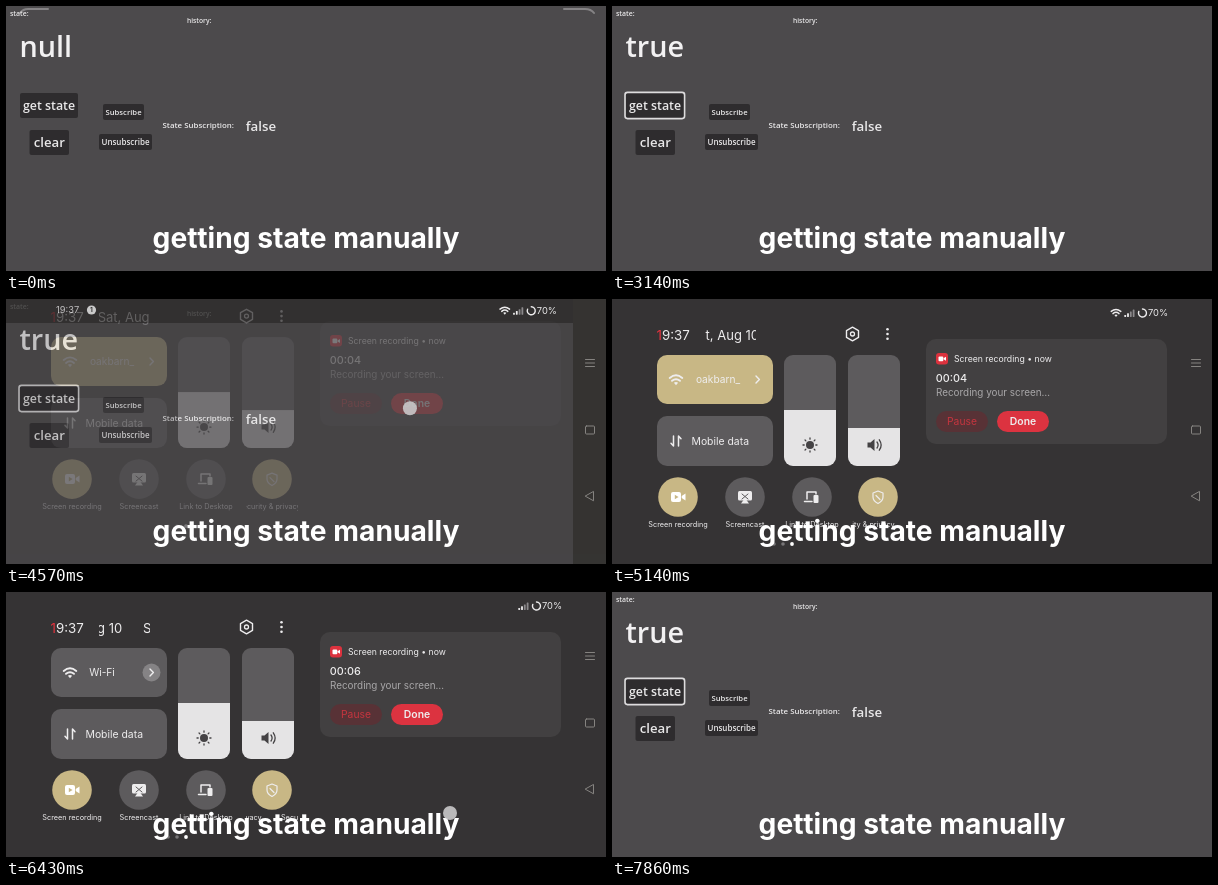
Animation of 600x265 px, one loop 8 s. Source, as an HTML page:

```html
<!DOCTYPE html>
<html lang="en">
<head>
<meta charset="utf-8">
<title>Getting state manually</title>
<style>
  html, body { margin: 0; width: 100%; height: 100%; overflow: hidden; background: #4c4a4c; }
  svg { display: block; width: 600px; height: 265px; }
  .app text { font-family: "Open Sans", sans-serif; font-weight: 600; fill: #e9e8e9; }
  .app .value { filter: blur(.5px); fill: #f2f1f2; }
  .ui text { font-family: Inter, sans-serif; fill: #eeedee; }
  .caption { font: 700 28.2px Inter, sans-serif; fill: #fff; }
  .line { fill: none; stroke: #eeedee; stroke-linecap: round; stroke-linejoin: round; }
</style>
</head>
<body>
<svg id="stage" viewBox="0 0 600 265" xmlns="http://www.w3.org/2000/svg"></svg>
<script>
const LOOP = 8000, STEP = 1000 / 7;
const GOLD = '#c8b785', GREY = '#5d5b5d', DARK = '#2e2c2e', PANEL = '#353334', LIGHT = '#eeedee';

const rect = (x, y, w, h, r, fill, extra = '') =>
  `<rect x="${x}" y="${y}" width="${w}" height="${h}" rx="${r}" fill="${fill}" ${extra}/>`;
const circle = (x, y, r, fill, extra = '') => `<circle cx="${x}" cy="${y}" r="${r}" fill="${fill}" ${extra}/>`;
const text = (x, y, size, content, extra = '') =>
  `<text x="${x}" y="${y}" font-size="${size}" ${extra}>${content}</text>`;
const line = (d, width = 1.3, extra = '') => `<path class="line" d="${d}" stroke-width="${width}" ${extra}/>`;
const group = (id, content, extra = '') => `<g id="${id}" ${extra}>${content}</g>`;
const MID = 'text-anchor="middle"';

const button = (x, y, w, h, label, size, base) =>
  rect(x, y, w, h, 2, DARK) + text(x + w / 2, base, size, label, MID);

const wifiIcon = (x, y, s) => `<g transform="translate(${x} ${y}) scale(${s})">` +
  line('M-6 -2Q0 -7 6 -2M-3.8 .8Q0 -2.4 3.8 .8', 1.8) +
  `<path d="M-2 2.6Q0 1 2 2.6L0 5Z" fill="${LIGHT}"/></g>`;

const marquee = (id, x, y, w, size, content, gap) =>
  `<clipPath id="${id}Clip"><rect x="${x}" y="${y - 14}" width="${w}" height="20"/></clipPath>
  <g clip-path="url(#${id}Clip)"><g id="${id}">${text(0, y, size, content)}${text(gap, y, size, content)}</g></g>`;

const app = `<g class="app">
  ${rect(0, 0, 600, 265, 0, '#4c4a4c')}
  ${group('corners', line('M14 7Q17 3 22 3H42M558 3H579Q585 3 588 7', 2, 'style="stroke:#858385"'))}
  ${text(4, 10, 6.9, 'state:')}
  ${text(181, 17, 6.7, 'history:')}
  ${text(13.5, 51.2, 28.8, 'null', 'id="value" class="value"')}
  ${button(14, 87, 58, 25, 'get state', 12.4, 104.4)}
  ${group('focus', rect(13, 86.4, 59.6, 26.2, 2.5, 'none', 'stroke="#dddcdd" stroke-width="1.6"'))}
  ${button(23.5, 124, 39.5, 25, 'clear', 13.2, 141.3)}
  ${button(97, 98, 41, 16, 'Subscribe', 7.7, 109)}
  ${button(93, 128, 53, 16, 'Unsubscribe', 8, 139)}
  ${text(156.5, 122.4, 7.9, 'State Subscription:')}
  ${text(239.7, 124.6, 13.3, 'false')}
</g>`;

const bars = group('bars',
  rect(0, 0, 567, 24, 0, '#282725', 'opacity=".74"') + rect(567, 0, 33, 265, 0, '#353431') +
  text(50, 14.3, 9.3, '19:37') + circle(85.5, 11, 4.6, '#fff') +
  text(85.5, 13.4, 6.5, '1', MID + ' style="fill:#333;font-weight:700"'));

const tile = (x, label, fill, icon) =>
  circle(x, 198, 19.8, fill) + icon + (label ? text(x, 228.4, 7.3, label, MID) : '');

const slider = (x, top) => {
  const id = 'slider' + x;
  return `<clipPath id="${id}">${rect(x, 56, 52, 111, 9, '#fff')}</clipPath>
    <g clip-path="url(#${id})">${rect(x, 56, 52, 111, 0, GREY)}${rect(x, top, 52, 170 - top, 0, '#e5e4e5')}</g>`;
};

const sunRays = Array.from({ length: 8 }, (_, i) => {
  const a = i * Math.PI / 4, c = Math.cos(a), s = Math.sin(a);
  return `M${198 + 5.8 * c} ${146 + 5.8 * s}L${198 + 7 * c} ${146 + 7 * s}`;
}).join('');
const inkStroke = 'style="stroke:#444244"';

const quickSettings = `
  ${text(44.5, 40.5, 13.3, '<tspan style="fill:#e5323d">1</tspan>9:37')}
  ${marquee('date', 93, 40.5, 51, 13, 'Sat, Aug 10', 90)}
  ${line('M240.5 28.2L246.5 31.6V38.4L240.5 41.8L234.5 38.4V31.6Z', 1.4)}
  ${circle(240.5, 35, 2, 'none', 'stroke="#eeedee" stroke-width="1.3"')}
  ${[30.3, 35, 39.7].map(y => circle(275.5, y, 1.3, LIGHT)).join('')}
  ${rect(45, 56, 116, 49, 10, GOLD, 'id="wifiTile"')}
  ${wifiIcon(64, 81, 1.05)}
  ${text(106, 84.3, 10.2, '', MID + ' id="wifiLabel"')}
  ${circle(145.5, 80.5, 9, '#858385', 'id="chevronDisc"')}
  ${line('M144 77L147.4 80.5L144 84', 1.4)}
  ${rect(45, 117, 116, 50, 10, GREY)}
  ${line('M61.5 137V147L59 144.3M66.5 147V137L69 139.7', 1.5)}
  ${text(79.5, 146, 10.4, 'Mobile data')}
  ${slider(172, 111)}${slider(236, 129)}
  ${circle(198, 146, 4, '#444244')}${line(sunRays, 1.3, inkStroke)}
  <path d="M255.5 143.5H258.5L262.5 140V152L258.5 148.5H255.5Z" fill="#444244"/>
  ${line('M265 143Q267.2 146 265 149M267.3 140.8Q271 146 267.3 151.2', 1.3, inkStroke)}
  ${tile(66, 'Screen recording', GOLD, rect(59, 193, 10, 10, 2, '#fff') +
    '<path d="M69.7 197L73.5 194.5V201.5L69.7 199Z" fill="#fff"/>' +
    '<path d="M62.8 195.7L66.6 198L62.8 200.3Z" fill="#c8b785"/>')}
  ${tile(133, 'Screencast', GREY, rect(126, 192, 14, 9.5, 1.5, LIGHT) +
    line('M130 195L136 200M130 200L136 195', 1, 'style="stroke:#5d5b5d"') +
    `<path d="M133 199L137 204.5H129Z" fill="${LIGHT}"/>`)}
  ${tile(200, 'Link to Desktop', GREY, line('M195 200V193H204V195M192.5 202.5H200', 1.5) +
    rect(201.5, 196, 5, 8, 1, LIGHT))}
  ${tile(266, '', GOLD, line('M266 192L271 194V198Q271 202 266 204.5Q261 202 261 198V194Z', 1.2) +
    line('M264 196.5L268 200.5', 1.2))}
  ${marquee('privacy', 240, 228.4, 52, 7.3, 'Security &amp; privacy', 82)}
  ${circle(162, 245, 1.8, '#777577')}${circle(171, 245, 1.8, '#777577')}${circle(180, 245, 1.9, '#fff')}`;

const notification = `
  ${rect(314, 40, 241, 105, 10, '#424041')}
  ${rect(324, 54, 12, 11.5, 3, '#dc323e')}
  ${rect(326.5, 57.4, 4.8, 4.8, 1, '#fff')}<path d="M331.5 59.3L334 57.8V61.8L331.5 60.3Z" fill="#fff"/>
  ${text(342, 63, 8.7, 'Screen recording • now')}
  ${text(323.8, 83, 10.8, '', 'id="timer" font-weight="500"')}
  ${text(324, 97.2, 9.9, 'Recording your screen…', 'style="fill:#a9a7a9"')}
  ${rect(324, 112, 52, 21, 10.5, '#583236')}
  ${text(350, 126.4, 10.3, 'Pause', MID + ' style="fill:#c5353f"')}
  ${rect(385, 112, 52, 21, 10.5, '#dc3340')}
  ${text(411, 126.4, 10.4, 'Done', MID + ' font-weight="600"')}`;

const panel = group('panel', rect(0, 0, 600, 265, 0, PANEL) + group('panelBody', quickSettings + notification));

const status = group('status',
  group('statusWifi', wifiIcon(497, 11, .8)) +
  [0, 1, 2, 3].map(i => rect(505.3 + i * 2.8, 13 - i * 1.8, 1.8, 2 + i * 1.8, .4, i < 2 ? LIGHT : '#8b898b')).join('') +
  line('M523.5 7A4 4 0 1 1 519.8 9.4', 1.4) + text(529, 14.4, 9.3, '70%'));

const nav = group('nav', ['M579.5 60.5H588.5M579.5 64H588.5M579.5 67.5H588.5',
  'M580.5 127H587.5Q588.5 127 588.5 128V134Q588.5 135 587.5 135H580.5Q579.5 135 579.5 134V128Q579.5 127 580.5 127Z',
  'M587.5 192.8V201.8L579.5 197.3Z'].map(d => line(d, 1, 'style="stroke:#858380"')).join(''));

const stage = document.getElementById('stage');
stage.innerHTML = app + `<g class="ui">${bars}${panel}${status}${nav}</g>` +
  text(300, 242.4, 28.2, 'getting state manually', MID + ' class="caption"') +
  circle(0, 0, 7, '#c9c8c9', 'id="touch" opacity=".9"');

const part = {};
stage.querySelectorAll('[id]').forEach(node => part[node.id] = node);

const ramp = (t, from, to) => {
  const p = Math.min(1, Math.max(0, (t - from) / (to - from)));
  return p * p * (3 - 2 * p);
};
const fade = (node, value) => node.setAttribute('opacity', value);
const move = (node, x, y = 0) => node.setAttribute('transform', `translate(${x} ${y})`);

// Each gesture: start, end, start point, end point
const gestures = [
  [1990, 2200, 48, 104, 48, 104],
  [4270, 4840, 406, 12, 402, 200],
  [5270, 5440, 92, 82, 92, 82],
  [6410, 6720, 444, 221, 438, 70],
];

function touchAt(t) {
  const hit = gestures.find(g => t >= g[0] && t < g[1]);
  part.touch.style.display = hit ? '' : 'none';
  if (!hit) return;
  const [start, end, x0, y0, x1, y1] = hit;
  const p = ramp(t, start + 20, end);
  move(part.touch, x0 + (x1 - x0) * p, y0 + (y1 - y0) * p);
}

function update(t) {
  const fetched = t >= 2280;
  fade(part.corners, 1 - ramp(t, 1900, 2600));
  part.value.textContent = fetched ? 'true' : 'null';
  part.focus.style.display = t >= 2130 ? '' : 'none';

  const barsShown = ramp(t, 3800, 4200) * (1 - ramp(t, 6780, 6995));
  const opened = ramp(t, 4430, 4860) * (1 - ramp(t, 6440, 6850));
  fade(part.bars, barsShown);
  fade(part.nav, barsShown);
  fade(part.status, barsShown);
  move(part.status, 7 * opened, 3 * opened);
  fade(part.panel, opened);
  move(part.panelBody, 0, -24 * (1 - opened));

  const wifiOn = t < 5420;
  part.wifiTile.setAttribute('fill', wifiOn ? GOLD : GREY);
  part.wifiLabel.textContent = wifiOn ? 'oakbarn_' : 'Wi-Fi';
  part.wifiLabel.setAttribute('x', wifiOn ? 106 : 96);
  part.chevronDisc.style.display = wifiOn ? 'none' : '';
  part.statusWifi.style.display = t < 5700 ? '' : 'none';
  part.timer.textContent = '00:0' + (4 + (t >= 5280) + (t >= 6280));

  const scrolled = (t - 5140) / 1000;
  move(part.date, 78 - 24 * scrolled);
  move(part.privacy, 220 - 21 * scrolled);
  touchAt(t);
}

const began = performance.now();
function tick() {
  const t = (performance.now() - began) % LOOP;
  update(Math.floor((t + 3) / STEP) * STEP % LOOP);
  requestAnimationFrame(tick);
}
update(0);
requestAnimationFrame(tick);
</script>
</body>
</html>
```
